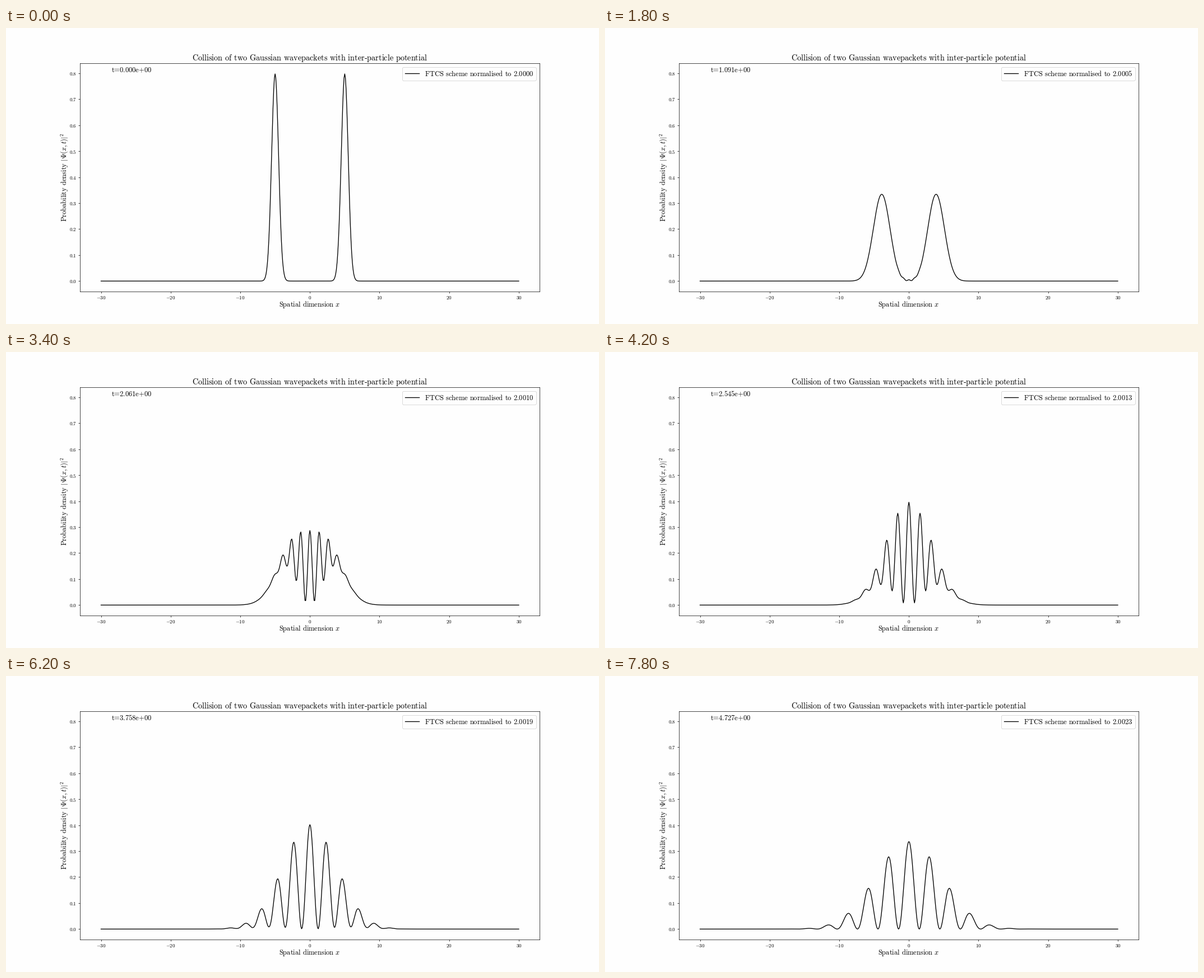
These frames come from a looping animation (1058x529 px, 8 s). A matplotlib script:

```python
import numpy as np
import matplotlib.pyplot as plt
from matplotlib.animation import FuncAnimation

W, H, DPI = 1058, 529, 64
FRAMES, INTERVAL = 40, 200
PAPER = "#fefefe"

DX, DT = 0.1, 1e-4
TIMES = np.linspace(0, 12, 100)[:FRAMES]

# The text font only sets line heights here; all glyphs are mathtext.
plt.rcParams.update({
    "mathtext.fontset": "cm",
    "font.family": "Liberation Serif",
    "figure.facecolor": PAPER,
    "axes.facecolor": PAPER,
})


def roman(words):
    """Upright Computer Modern text with normal word spaces."""
    parts = [rf"\text{{{word}}}" for word in words.split()]
    return r"\hspace{0.38}".join(parts)


def packet(x, centre, k):
    return (2 / np.pi) ** 0.25 * np.exp(-(x - centre) ** 2 + 1j * k * x)


# Periodic grid; each Fourier mode gets the same factor in every FTCS step.
grid = -30 + DX * np.arange(600)
modes = np.fft.fft(packet(grid, -5, 1) + packet(grid, 5, -1))
k = 2 * np.pi * np.fft.fftfreq(grid.size, DX)
energy = (1 - np.cos(k * DX)) / DX**2
x = np.append(grid, 30)


def density(t):
    psi = np.fft.ifft(modes * (1 - 1j * energy * DT) ** round(t / DT))
    return np.abs(psi) ** 2


fig, ax = plt.subplots(figsize=(W / DPI, H / DPI), dpi=DPI)
peak = np.sqrt(2 / np.pi)
ax.set_xlim(-33, 33)
ax.set_ylim(-0.05 * peak, 1.05 * peak)
ax.set_xticks(np.arange(-30, 31, 10))
ax.set_yticks(np.arange(9) / 10)
ax.xaxis.set_major_formatter(lambda v, _: f"${v:.0f}$")
ax.yaxis.set_major_formatter(lambda v, _: f"${v:.1f}$")
ax.tick_params(labelsize=10)

title = "Collision of two Gaussian wavepackets with inter-particle potential"
ax.set_title(f"${roman(title)}$", fontsize=16)


def axis_label(px, py, text, **kw):
    fig.text(px / W, 1 - py / H, text, fontsize=14, ha="center",
             va="baseline", **kw)


space = r"\hspace{0.38}"
axis_label(542.2, 497.8, f"${roman('Spatial dimension')}{space}x$")
axis_label(107.4, 267.2,
           rf"${roman('Probability density')}{space}|\Psi(x,t)|^2$",
           rotation=90, rotation_mode="anchor")


def norm_label(norm):
    return f"${roman(f'FTCS scheme normalised to {norm:.4f}')}$"


line, = ax.plot([], [], color="black", lw=1.5, label=norm_label(2))
clock = ax.text(-28.5, 0.803, "", fontsize=14)
legend_text = ax.legend(loc="upper right", fontsize=14).get_texts()[0]


def draw(i):
    t = TIMES[i]
    rho = density(t)
    line.set_data(x, np.append(rho, rho[0]))
    clock.set_text(f"${roman(f't={t:.3e}')}$")
    legend_text.set_text(norm_label(rho.sum() * DX))
    return line, clock, legend_text


anim = FuncAnimation(fig, draw, frames=FRAMES, interval=INTERVAL,
                     init_func=lambda: draw(0), repeat=True)
plt.show()
```
